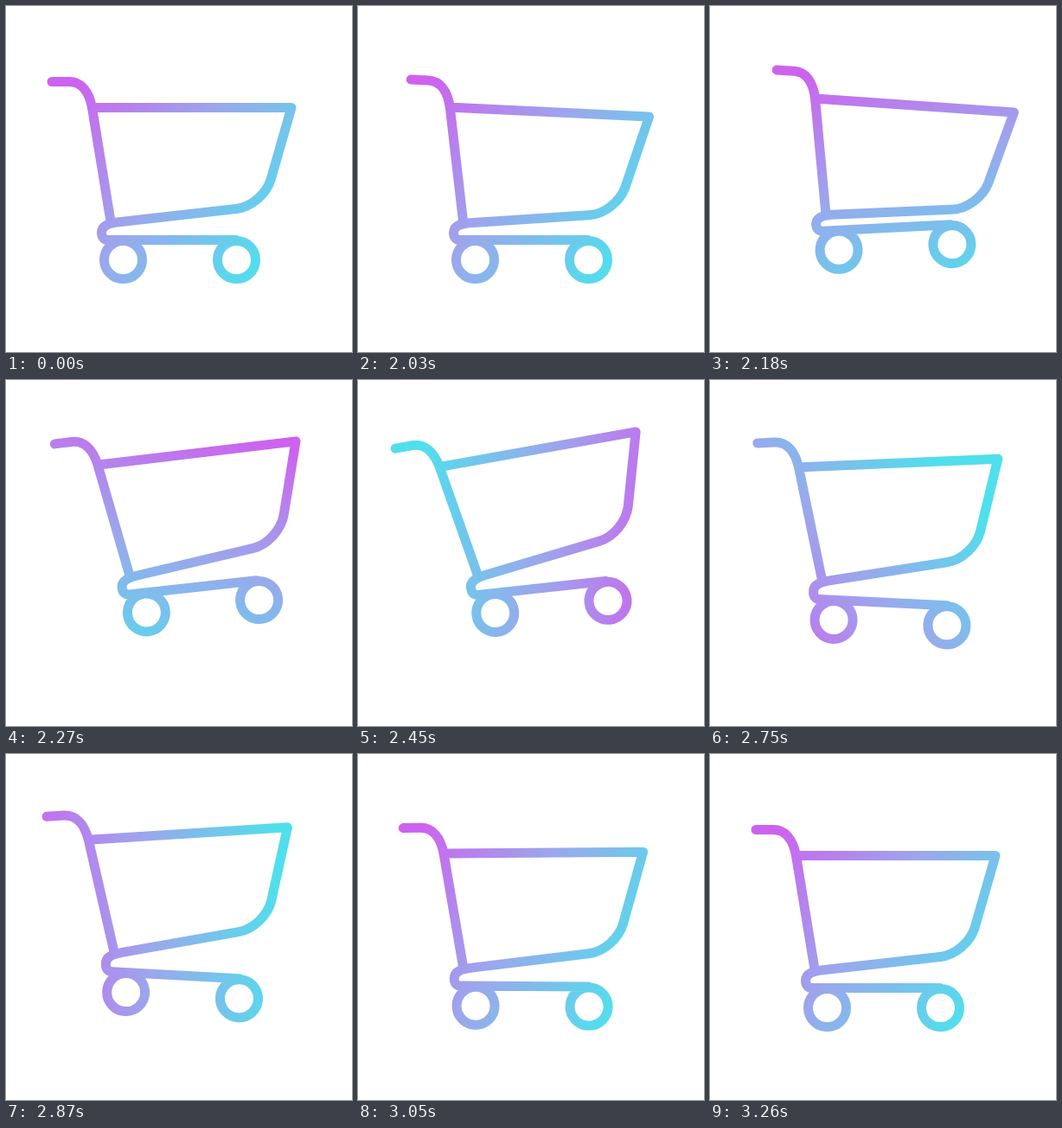
An HTML page with a canvas that plays this animation: 400 by 400 pixels, repeating every 3.32 s.

```html
<!DOCTYPE html>
<html lang="en">
<head>
<meta charset="utf-8">
<title>Hopping cart</title>
<style>
  html, body { margin: 0; width: 100%; height: 100%; overflow: hidden; background: #fff; }
  canvas { display: block; width: 400px; height: 400px; }
</style>
</head>
<body>
<canvas id="stage"></canvas>
<script>
const LOOP = 3320, REST = 2000, STEP = 30;
const HINGE = { x: 111, y: 262 };

// Each hop: the basket braces forward, then the cart flies and the basket swings back.
const HOPS = [
  { brace: [0, 310], forward: 9, air: [130, 585], lift: 25.5, tilt: -7.4, back: 12.15 },
  { brace: [530, 760], forward: 6, air: [600, 1065], lift: 19.7, tilt: 3.2, back: 3.7 }
];

const basket = new Path2D(
  "M53 87.5H73C87 87.5 96 99 99.5 117.5L121 249" +
  "M103 117.5H330L306 201C301 217 284 232.5 266 234.5L133 249.5" +
  "C118 251 110.5 254 110.5 262");
const chassis = new Path2D("M110.5 262C110.5 268 114 270.5 118 270.5H266");
for (const x of [135.5, 266.5]) {
  chassis.moveTo(x + 22, 293.5);
  chassis.arc(x, 293.5, 22, 0, Math.PI * 2);
}

const canvas = document.getElementById("stage");
const ctx = canvas.getContext("2d");
const dpr = window.devicePixelRatio || 1;
canvas.width = canvas.height = 400 * dpr;
ctx.scale(dpr, dpr);
ctx.lineWidth = 11;
ctx.lineCap = ctx.lineJoin = "round";

const span = (t, [from, to]) => Math.min(1, Math.max(0, (t - from) / (to - from)));
const smooth = u => u * u * (3 - 2 * u);
const arc = u => 4 * u * (1 - u);
const bump = u => Math.sin(Math.PI * u);

function poseAt(t) {
  const drift = Math.cos(Math.PI / 2 * span(t, [190, 1160])) ** 2;
  const pose = {
    x: 24 * smooth(span(t, [90, 270])) * drift,
    y: 0, tilt: 0, lean: 0,
    turn: 360 * (1 - (1 - span(t, [0, 1260]) ** 1.75) ** 3)
  };
  for (const hop of HOPS) {
    const air = arc(span(t, hop.air));
    pose.y -= hop.lift * air;
    pose.tilt += hop.tilt * air;
    pose.lean += hop.forward * bump(span(t, hop.brace)) - hop.back * air;
  }
  return pose;
}

function addPart(all, part, { x, y }, angle) {
  all.addPath(part, new DOMMatrix()
    .translate(HINGE.x + x, HINGE.y + y)
    .rotate(angle)
    .translate(-HINGE.x, -HINGE.y));
}

// The gradient travels with the cart while it turns once.
function paint({ x, y, turn }) {
  const a = (36.5 + turn) * Math.PI / 180;
  const cx = 175 + x, cy = 234 + y, dx = 300 * Math.cos(a), dy = 300 * Math.sin(a);
  const g = ctx.createLinearGradient(
    cx - 0.54 * dx, cy - 0.54 * dy, cx + 0.46 * dx, cy + 0.46 * dy);
  ["#cd62ee", "#9aa8ec", "#50dfec"].forEach((c, i) => g.addColorStop(i / 2, c));
  return g;
}

function draw(ms) {
  const t = Math.floor((ms % LOOP - REST) / STEP) * STEP;
  const pose = poseAt(t);
  const cart = new Path2D();
  addPart(cart, chassis, pose, pose.tilt);
  addPart(cart, basket, pose, pose.lean);
  ctx.fillStyle = "#fff";
  ctx.fillRect(0, 0, 400, 400);
  ctx.strokeStyle = paint(pose);
  ctx.stroke(cart);
}

const begin = performance.now();
function tick() {
  draw(performance.now() - begin);
  requestAnimationFrame(tick);
}
tick();
</script>
</body>
</html>
```
